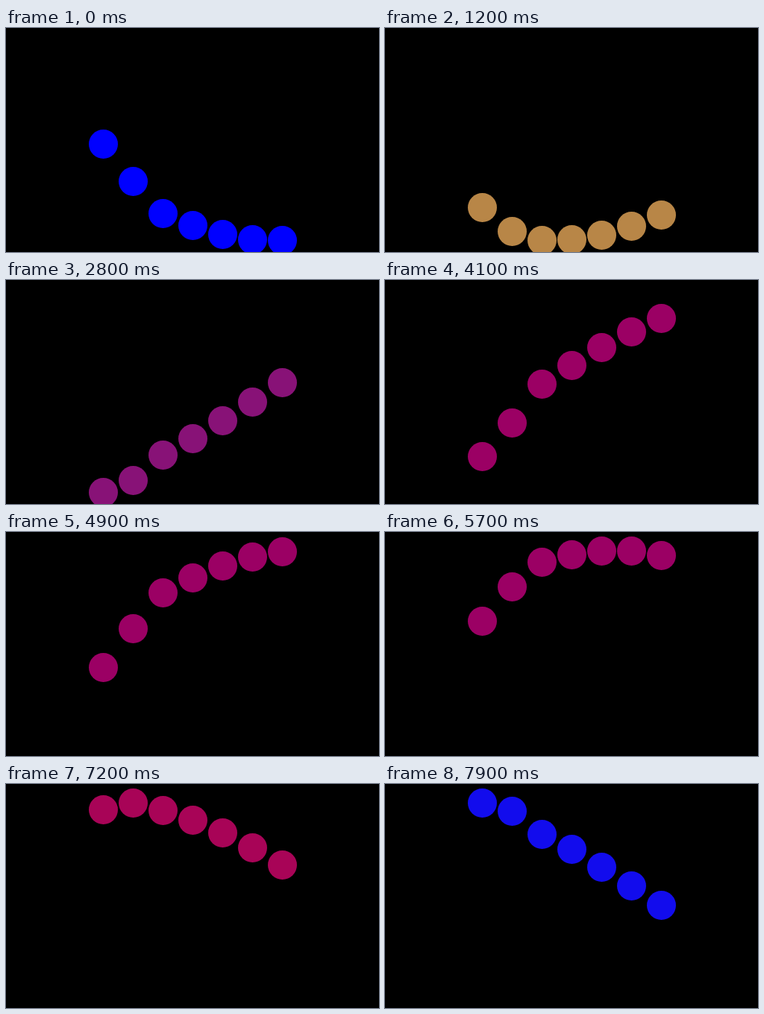
An HTML page with a canvas that plays this animation: 500 px wide and 300 px high, repeating every 8000 ms.

```html
<!DOCTYPE html>
<html lang="en">
<head>
<meta charset="utf-8">
<title>Wave of balls</title>
<style>
  html, body { margin: 0; width: 100%; height: 100%; overflow: hidden; background: #000; }
  canvas { display: block; }
</style>
</head>
<body>
<canvas id="stage" width="500" height="300"></canvas>
<script>
const ctx = document.getElementById('stage').getContext('2d');
const LOOP = 8000, STEP = 100, SPEED = 0.06, BALLS = 7;

// a wandering point sets the colour: x is red, y is green, blue is 255 - x
const PATH = [
  { at: 0, x: 0, y: 0 },
  { at: 12, x: 184, y: 134 },
  { at: 28, x: 136, y: 18 },
  { at: 41, x: 155, y: 0 },
  { at: 57, x: 155, y: 0 },
  { at: 72, x: 168, y: 4 },
  { at: 79, x: 18, y: 12 }
];

function colorAt(n) {
  const i = Math.max(1, PATH.findIndex(p => p.at >= n));
  const a = PATH[i - 1], b = PATH[i];
  const k = (n - a.at) / (b.at - a.at);
  const x = Math.round(a.x + (b.x - a.x) * k);
  const y = Math.round(a.y + (b.y - a.y) * k);
  return `rgb(${x}, ${y}, ${255 - x})`;
}

function ball(x, y) {
  ctx.beginPath();
  ctx.arc(x + 0.5, y + 0.5, 19.5, 0, Math.PI * 2);
  ctx.fill();
}

function draw(n) {
  ctx.fillStyle = '#000';
  ctx.fillRect(0, 0, 500, 300);
  ctx.fillStyle = colorAt(n);
  for (let i = 0; i < BALLS; i++) {
    // the first two gaps are twice as long
    const offset = 0.2 * (i + Math.min(i, 2));
    const y = Math.floor(155 + 130 * Math.sin(n * SPEED + offset));
    ball(130 + 40 * i, y);
  }
}

const start = performance.now();
function tick() {
  const t = (performance.now() - start) % LOOP;
  draw(Math.floor(t / STEP));
  requestAnimationFrame(tick);
}
tick();
</script>
</body>
</html>
```
